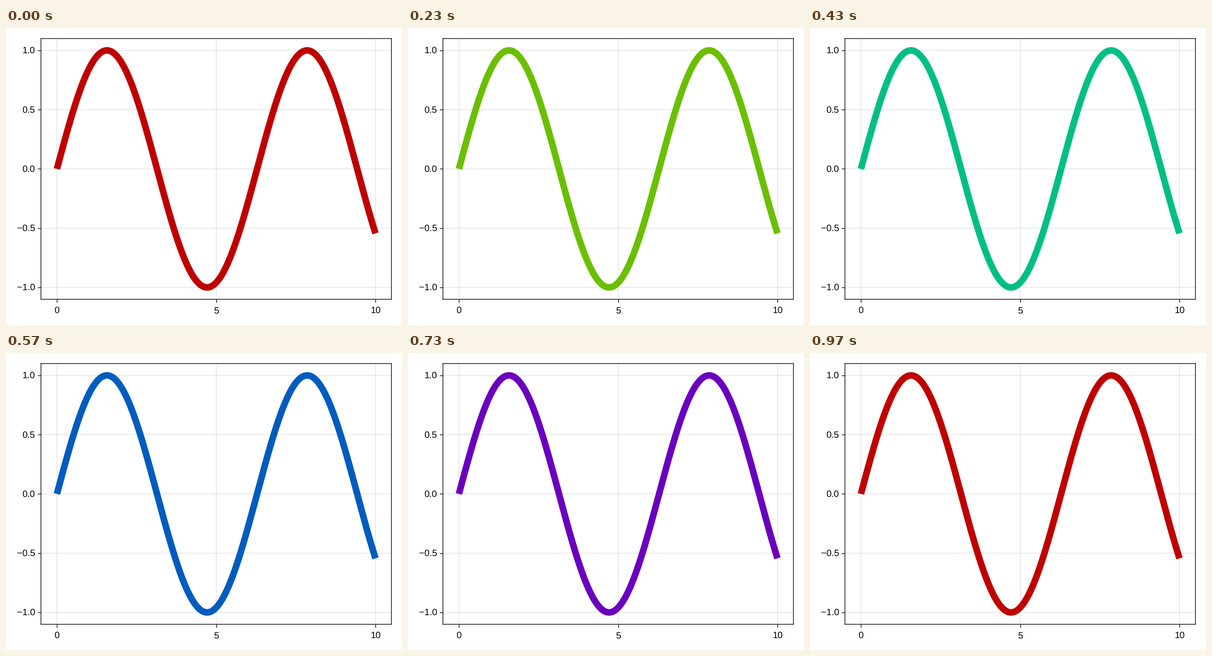
Recreate the animation shown at these times as a matplotlib script. Size 864 by 648 pixels, loop 1 s.

```python
import colorsys

import matplotlib.pyplot as plt
import numpy as np
from matplotlib.animation import FuncAnimation

WIDTH, HEIGHT, DPI = 864, 648, 72  # at 72 dpi one point is one pixel
UNIT = 1.44                        # pixels per layout unit
STEP_MS, STEPS = 10, 100
COLORS = 30

plt.rcParams.update({
    "font.family": "Liberation Sans",
    "font.size": 14 * UNIT,
    "text.hinting": "none",
    "path.snap": False,
})


def hue_color(index):
    """Colour number `index` of a full turn of hue, both ends included."""
    return colorsys.hsv_to_rgb(index / (COLORS - 1) % 1, 1, 0.75)


def make_axes(fig, left, right, top, bottom):
    """Axes placed by layout units, measured from the top left corner."""
    w, h = WIDTH / UNIT, HEIGHT / UNIT
    ax = fig.add_axes([left / w, 1 - bottom / h, (right - left) / w, (bottom - top) / h])
    ax.set(xlim=(-0.5, 10.5), ylim=(-1.1, 1.1))
    ax.set_xticks([0, 5, 10], ["0", "5", "10"])
    values = np.linspace(-1, 1, 5)
    ax.set_yticks(values, [f"{v:.1f}".replace("-", "\u2212") for v in values])
    ax.tick_params(length=5 * UNIT, width=UNIT)
    ax.tick_params(axis="x", pad=9)
    ax.tick_params(axis="y", pad=4 * UNIT)
    ax.grid(color="black", alpha=0.12, linewidth=UNIT)
    ax.set_axisbelow(True)
    for spine in ax.spines.values():
        spine.set_linewidth(UNIT)
    return ax


fig = plt.figure(figsize=(WIDTH / DPI, HEIGHT / DPI), dpi=DPI, facecolor="white")
ax = make_axes(fig, left=53, right=584, top=16, bottom=411)

x = np.linspace(0, 10, 400)
wave, = ax.plot(x, np.sin(x), linewidth=10 * UNIT, color=hue_color(0),
                solid_capstyle="butt", solid_joinstyle="miter")


def update(step):
    # 30 colours per second, each change rounded to 10 ms
    wave.set_color(hue_color((3 * step + 1) // 10))
    return wave,


animation = FuncAnimation(fig, update, frames=STEPS, interval=STEP_MS,
                          repeat=True, repeat_delay=0)
plt.show()
```
